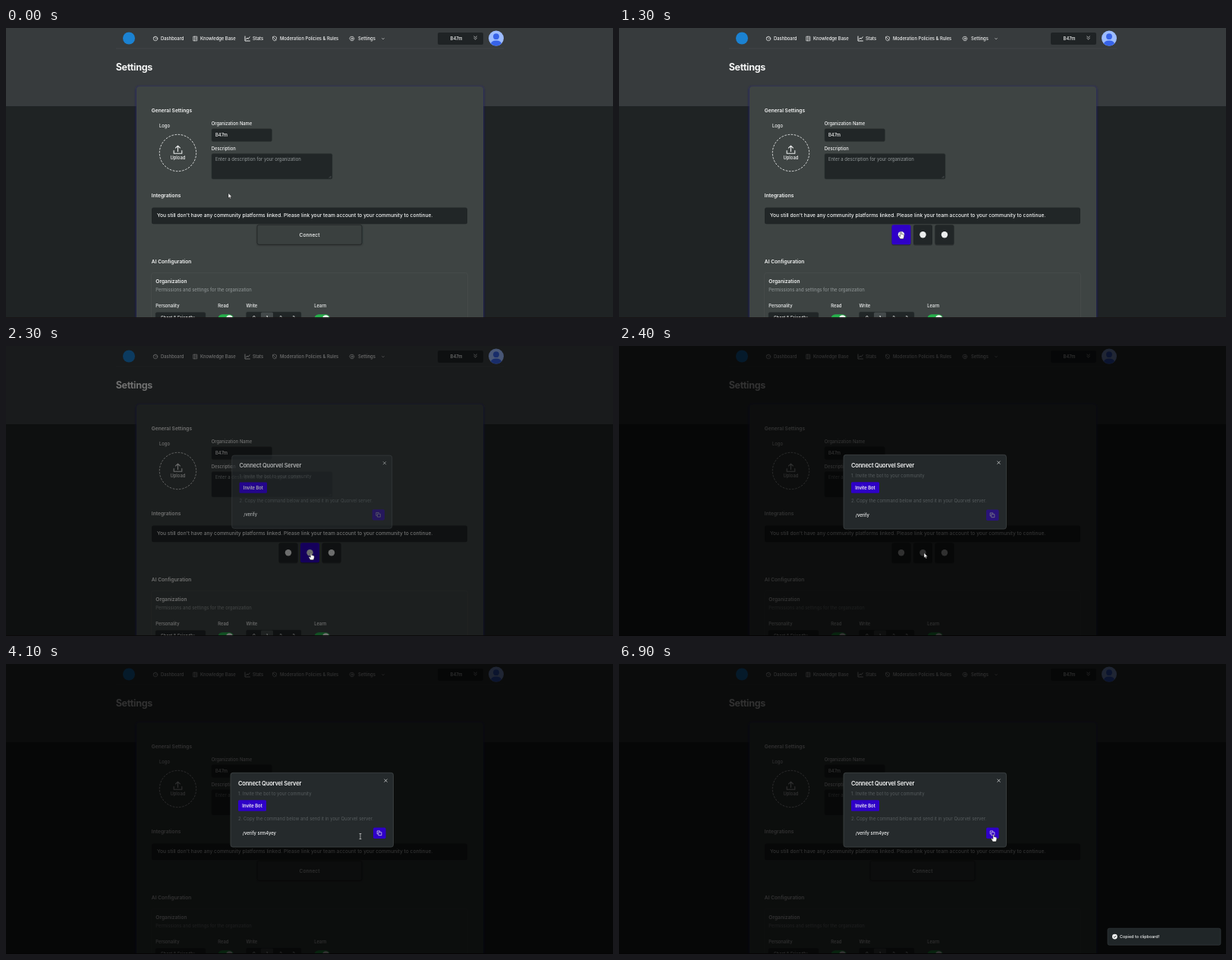
Write an HTML page that moves like this. It is 800 px wide and 382 px high and loops after 7 s.

```html
<!DOCTYPE html>
<html lang="en">
<head>
<meta charset="utf-8">
<title>Settings</title>
<style>
html, body { margin: 0; width: 100%; height: 100%; overflow: hidden; background: #1f2324; }
svg { display: block; width: 100vw; height: 100vh; }
text { font-family: Inter, Roboto, sans-serif; font-size: 5.83px; font-weight: 500; fill: #f4f5f5; }
.h1 { font-size: 12.5px; font-weight: 700; letter-spacing: -.025em; }
.h2 { font-size: 6.67px; font-weight: 600; }
.big { font-size: 6.67px; }
.title { font-size: 7.5px; font-weight: 600; letter-spacing: -.025em; }
.muted { font-size: 5.95px; font-weight: 400; fill: #949a9b; }
.faint { font-size: 5.95px; font-weight: 400; fill: #565c5e; }
.bold { font-weight: 600; }
.toast { font-size: 5.42px; }
.mid { text-anchor: middle; }
.line { fill: none; stroke: #e8eaea; stroke-width: .7; stroke-linecap: round; stroke-linejoin: round; }
.field { fill: #212627; stroke: #2b3031; stroke-width: .5; }
</style>
</head>
<body>
<svg viewBox="0 0 800 382" preserveAspectRatio="none">
  <defs>
    <filter id="glow" x="-10%" y="-10%" width="120%" height="120%"><feGaussianBlur stdDeviation="1.6"/></filter>
    <filter id="soft" x="-10%" y="-30%" width="120%" height="160%"><feGaussianBlur stdDeviation="1.2"/></filter>
  </defs>

  <rect width="800" height="382" fill="#1f2324"/>
  <rect width="800" height="103" fill="#373b3d"/>
  <path d="M145 27H656" stroke="#454a4c" stroke-width=".7"/>

  <g id="nav">
    <circle cx="162" cy="13.5" r="8" fill="#1b82d2"/>
    <g class="line">
      <circle cx="197" cy="14" r="2.8"/><path d="M197 14.6L198.3 13M194.6 12.6H195.3M197 11.3V12"/>
      <path d="M247.2 11.2H251.8V16.8H247.2ZM248.7 11.2V16.8M250 13H251M250 14.8H251"/>
      <path d="M315 11V17H321.4M316.4 14.8L318 13L319.2 14.3L321.2 11.8" stroke-width="1"/>
      <path d="M354 11.1L356.5 12.1V14Q356.5 16 354 17Q351.5 16 351.5 14V12.1ZM352 12L356 16"/>
      <circle cx="456" cy="14" r="1"/><path d="M454.6 11.4H457.4L459 14L457.4 16.6H454.6L453 14Z"/>
      <path d="M495.8 13.6L497 14.8L498.2 13.6"/>
    </g>
    <rect x="569" y="6" width="60" height="16" rx="2" fill="#1f2325"/>
    <path class="line" d="M616.8 11L618.6 12.6L620.4 11M616.8 13.4L618.6 15L620.4 13.4" stroke-width="1"/>
    <circle cx="646" cy="13.6" r="10" fill="#9dbcff"/>
    <circle cx="646" cy="11.2" r="3.9" fill="#3763e8"/>
    <path d="M638.9 20.6A7.3 5.2 0 0 1 653.1 20.6A10 10 0 0 1 638.9 20.6Z" fill="#3763e8"/>
  </g>

  <rect x="171.5" y="77" width="458" height="330" rx="4" fill="#25206a" filter="url(#glow)"/>
  <rect x="172" y="77" width="457" height="330" rx="4" fill="#3e4443"/>

  <circle cx="226.5" cy="164.5" r="24.2" fill="none" stroke="#e4e6e6" stroke-width=".9" stroke-dasharray="2.6 1.6"/>
  <path class="line" style="stroke-width:1.1" d="M221.2 161.6V165.2H231.8V161.6M226.5 162.6V155.4M223.6 158L226.5 155.2L229.4 158"/>
  <rect class="field" x="271" y="132.7" width="79.5" height="16.8" rx="2"/>
  <rect class="field" x="271" y="165.5" width="159" height="33.5" rx="2"/>
  <path d="M425.8 197.6L428.4 195M427.4 197.6L428.4 196.6" stroke="#8a9090" stroke-width=".4"/>
  <rect x="192" y="236.5" width="416" height="21.7" rx="2.5" fill="#212627"/>

  <rect x="191.5" y="322.5" width="417" height="80" rx="3" fill="none" stroke="#4a504d" stroke-width=".6"/>
  <rect class="field" x="197" y="374.6" width="66" height="17" rx="2"/>
  <rect class="field" x="316.5" y="374" width="72.5" height="17" rx="2"/>
  <rect x="336" y="374.5" width="16" height="16" rx="1.5" fill="#444a4b"/>
  <g id="toggles"></g>
  <g id="labels"></g>

  <g id="connect">
    <rect x="331" y="260" width="138.5" height="26" rx="2.5" fill="#1b1e1f" opacity=".6" filter="url(#soft)"/>
    <rect x="331" y="259.3" width="138" height="26" rx="2.5" fill="#3a403f" stroke="#202425" stroke-width=".8"/>
    <text class="big mid" x="400" y="274.6">Connect</text>
  </g>
  <g id="platforms"></g>
  <rect y="381" width="800" height="1" fill="#191516"/>

  <rect id="shade" width="800" height="382" fill="#000"/>

  <g id="modal">
    <rect x="296" y="143.3" width="214.5" height="97.8" rx="3" fill="#252a2c" stroke="#454b4d" stroke-width=".7"/>
    <text class="title" x="306" y="159.7">Connect Quorvel Server</text>
    <path class="line" d="M498.8 151.9L502.2 155.3M502.2 151.9L498.8 155.3"/>
    <text class="faint" x="306" y="173.3">1. Invite the bot to your community</text>
    <rect x="306" y="179.3" width="37" height="14.4" rx="1.5" fill="#2f00c8"/>
    <text class="bold mid" x="324.5" y="188.6">Invite Bot</text>
    <text class="faint" x="306" y="206.3">2. Copy the command below and send it in your Quorvel server.</text>
    <text id="command" x="311.8" y="225">/verify</text>
    <g id="copy">
      <rect x="484" y="215.6" width="16.6" height="14.4" rx="1.8" fill="#2f00c8"/>
      <path class="line" d="M491.3 221.7H494.9V225.7H491.3ZM490 223.9H489.2V219.9H492.8V220.6"/>
    </g>
  </g>

  <g id="toast">
    <rect x="644" y="348.2" width="149" height="22" rx="2.2" fill="#202628" stroke="#3a4143" stroke-width=".6"/>
    <circle cx="653.4" cy="359.1" r="3.4" fill="#f4f5f5"/>
    <path d="M651.9 359.2L653 360.3L655 358" fill="none" stroke="#202628" stroke-width=".9"/>
    <text class="toast" x="660" y="361.2">Copied to clipboard!</text>
  </g>

  <g id="cursor" stroke-linejoin="round">
    <path id="arrow" d="M0 0V6.6L1.5 5.3L2.5 7.5L3.6 7L2.6 4.9L4.6 4.7Z" fill="#fff" stroke="#111" stroke-width=".5"/>
    <path id="hand" d="M-.7 .2Q0 -.6 .7 .2V3L2.2 3.2L4.2 4V6.5L3.3 9.3H-1L-3 5.6Q-2.6 4.6 -1.6 5.2L-.7 6Z" fill="#fff" stroke="#111" stroke-width=".5"/>
    <path id="beam" d="M-1.4 -3.5H1.4M0 -3.5V3.5M-1.4 3.5H1.4" fill="none" stroke="#d8dada" stroke-width=".7"/>
  </g>
</svg>
<script>
const LOOP = 7000, STEP = 100;
const $ = id => document.getElementById(id);

function add(parent, tag, attrs, text) {
  const el = document.createElementNS("http://www.w3.org/2000/svg", tag);
  for (const k in attrs) el.setAttribute(k, attrs[k]);
  if (text) el.textContent = text;
  return parent.appendChild(el);
}

const org = "B47m";
[
  [204, 16.1, "Dashboard"], [256, 16.1, "Knowledge Base"], [325, 16.1, "Stats"],
  [361, 16.1, "Moderation Policies & Rules"], [464, 16.1, "Settings"], [593.5, 15.8, org, "mid"],
  [144.7, 56.3, "Settings", "h1"],
  [191.8, 110.6, "General Settings", "h2"], [202, 130.8, "Logo"], [226.4, 173.2, "Upload", "mid"],
  [270.8, 128.3, "Organization Name"], [276, 143.3, org], [270.8, 161.2, "Description"],
  [276, 175.3, "Enter a description for your organization", "muted"],
  [191.8, 223.4, "Integrations", "h2"],
  [199, 249, "You still don't have any community platforms linked. Please link your team account to your community to continue.", "big"],
  [191.8, 310, "AI Configuration", "h2"], [197.3, 335.7, "Organization", "h2"],
  [197.3, 347, "Permissions and settings for the organization", "muted"],
  [197.3, 368.4, "Personality"], [279.3, 368.4, "Read"], [316.5, 368.4, "Write"], [406.3, 368.4, "Learn"],
  [204, 384.4, "Short & Friendly"],
  [327, 384.4, "0", "mid"], [344, 384.4, "1", "mid"], [362, 384.4, "2", "mid"], [379, 384.4, "3", "mid"]
].forEach(([x, y, text, cls = ""]) => add($("labels"), "text", { x, y, class: cls }, text));

for (const x of [279.5, 406.5]) {
  add($("toggles"), "rect", { x, y: 377.2, width: 20.5, height: 11, rx: 5.5, fill: "#27b04c" });
  add($("toggles"), "circle", { cx: x + 15, cy: 382.7, r: 4.5, fill: "#f4f5f5" });
}

const tiles = [372, 400.5, 429].map(x => {
  add($("platforms"), "rect", { x: x - 12.5, y: 260, width: 25, height: 26.4, rx: 2.5, fill: "#1b1e1f", opacity: .5 });
  const tile = add($("platforms"), "rect", { x: x - 12.5, y: 259.2, width: 25, height: 26, rx: 2.5 });
  add($("platforms"), "circle", { cx: x, cy: 272.2, r: 4.2, fill: "#eceeee" });
  return tile;
});

const clamp = p => Math.max(0, Math.min(1, p));
const easeOut = p => 1 - Math.pow(1 - clamp(p), 2.2);
const smooth = p => { p = clamp(p); return p * p * (3 - 2 * p); };
const show = (id, on) => $(id).setAttribute("display", on ? "inline" : "none");
const fade = (id, a) => $(id).setAttribute("opacity", a);

// start, end, x, y of each pointer move
const moves = [
  [0, 0, 293, 217.5], [100, 700, 371.5, 268.5], [1400, 1900, 402, 272.5],
  [3000, 4000, 467, 227], [4200, 4700, 493.6, 224.6]
];

function pointer(t) {
  let [, , x, y] = moves[0];
  for (const [from, to, nx, ny] of moves.slice(1)) {
    const k = smooth((t - from) / (to - from));
    x += (nx - x) * k;
    y += (ny - y) * k;
  }
  return [x, y];
}

const inside = (x, y, l, t, r, b) => x > l && x < r && y > t && y < b;

function draw(t) {
  const [x, y] = pointer(t);
  const picking = t >= 900 && t < 2800;
  const open = easeOut((t - 2220) / 200);
  const ready = t >= 2800;
  const blocked = t >= 2400;

  show("connect", !picking);
  show("platforms", picking);
  tiles.forEach((tile, i) => {
    const left = 359.5 + i * 28.5;
    const hot = !blocked && inside(x, y, left, 259, left + 25, 285);
    tile.setAttribute("fill", hot ? "#2f00c8" : "#212627");
  });

  fade("shade", .8 * open);
  fade("modal", open);
  const s = .95 + .05 * open;
  $("modal").setAttribute("transform", `translate(403.3 192.2) scale(${s}) translate(-403.3 -192.2)`);
  $("command").textContent = ready ? "/verify srm4yey" : "/verify";
  fade("copy", ready ? 1 : .5);

  const rise = easeOut((t - 4970) / 400);
  fade("toast", rise);
  $("toast").setAttribute("transform", `translate(0 ${22 * (1 - rise)})`);

  const beam = blocked && inside(x, y, 306, 214, 482, 232);
  const hand = blocked ? inside(x, y, 484, 215, 501, 230) : inside(x, y, 331, 259, 469, 286);
  show("beam", beam);
  show("hand", hand);
  show("arrow", !beam && !hand);
  $("cursor").setAttribute("transform", `translate(${x} ${y})`);
}

const begin = performance.now();
function tick(now) {
  const t = Math.max(0, now - begin) % LOOP;
  draw(Math.floor(t / STEP) * STEP);
  requestAnimationFrame(tick);
}
draw(0);
requestAnimationFrame(tick);
</script>
</body>
</html>
```
